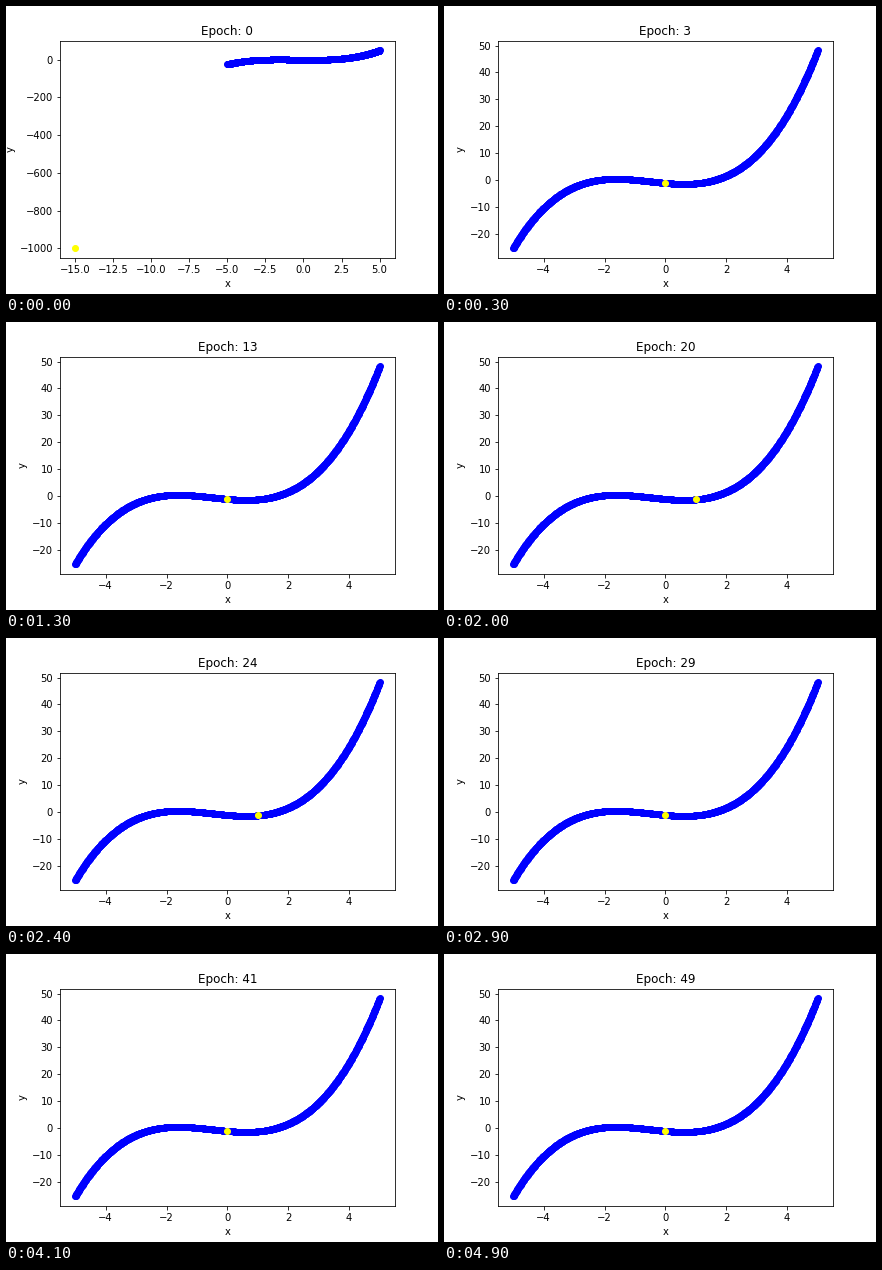
These frames come from a looping animation (432 by 288 pixels, 5 s). A matplotlib script:

```python
import numpy as np
import matplotlib.pyplot as plt
from matplotlib.animation import FuncAnimation

EPOCHS = 50
INTERVAL = 100
START = -15

plt.rcParams["font.family"] = "DejaVu Sans"


def cost(x):
    return x**3 / 3 + x**2 / 2 - x - 1


def position(epoch):
    """After the start, unit-rate descent bounces between 0 and 1."""
    return START if epoch == 0 else 1 - epoch % 2


curve_x = np.linspace(-5, 5, 1000)
curve_y = cost(curve_x)

fig, ax = plt.subplots(figsize=(6, 4), dpi=72, facecolor="white")
fig.subplots_adjust(left=0.125, right=0.9, bottom=0.125, top=0.88)


def draw(epoch):
    ax.clear()
    x = position(epoch)
    ax.plot(curve_x, curve_y, "o", color="blue", markersize=6)
    ax.plot([x], [cost(x)], "o", color="yellow", markersize=6)
    ax.set_title(f"Epoch: {epoch}")
    ax.set_xlabel("x")
    ax.set_ylabel("y")
    return ax.lines


anim = FuncAnimation(fig, draw, frames=EPOCHS, init_func=lambda: draw(0),
                     interval=INTERVAL, repeat=True, repeat_delay=0)
plt.show()
```
